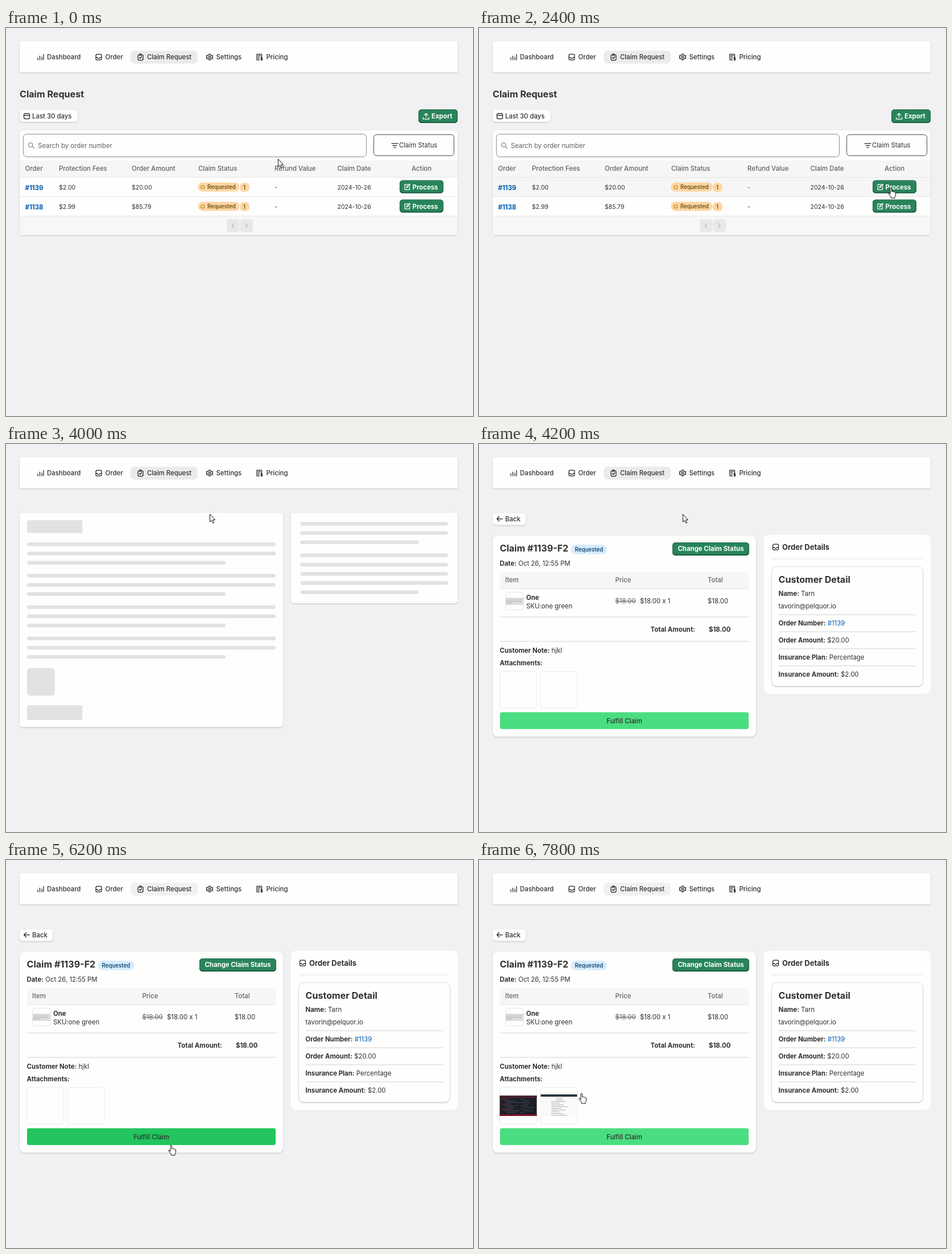
These frames come from a looping animation (821 px wide and 682 px high, 8000 ms). An HTML page:

```html
<!DOCTYPE html>
<html lang="en">
<head>
<meta charset="utf-8">
<title>Claim Request</title>
<style>
html, body { margin: 0; width: 100%; height: 100%; overflow: hidden; background: #f1f1f3; }
svg { display: block; width: 821px; height: 682px; font: 11.4px Inter, sans-serif; fill: #303030; }
text { white-space: pre; }
.m { font-weight: 550; }
.b { font-weight: 650; }
.h { font-size: 16.1px; font-weight: 650; }
.s { font-size: 10.5px; }
.badge { font-size: 9.75px; font-weight: 500; }
.grey { fill: #616161; }
.link { fill: #005bb0; }
.white { fill: #fff; }
.mid { text-anchor: middle; }
.card { fill: #fefefd; filter: drop-shadow(0 1px 1px #0003); }
.line { fill: none; stroke: currentColor; stroke-width: 1.25; stroke-linejoin: round; stroke-linecap: round; }
</style>
</head>
<body>
<svg id="stage" viewBox="0 0 821 682"></svg>
<script>
const LOOP = 8000, STEP = 200;

const text = (x, y, s, cls = '') => `<text x="${x}" y="${y}" class="${cls}">${s}</text>`;
const rect = (x, y, w, h, r, fill, more = '') =>
  `<rect x="${x}" y="${y}" width="${w}" height="${h}" rx="${r}" fill="${fill}" ${more}/>`;
const card = (x, y, w, h, r = 6) => rect(x, y, w, h, r, '', 'class="card"');
const outline = (x, y, w, h, r, color) => rect(x + .5, y + .5, w - 1, h - 1, r, 'none', `stroke="${color}"`);
const rule = (x, y, w, color = '#d4d4d4') => rect(x, y, w, 1, 0, color);
const icon = (x, y, d, color = '#222', size = 1) =>
  `<path class="line" transform="translate(${x} ${y}) scale(${size})" color="${color}" d="${d}"/>`;
const group = (id, body) => `<g id="${id}">${body}</g>`;
const greenButton = (x, y, w, h) => rect(x, y, w, h, 5.5, '#0c5132') +
  rect(x + 1, y + 1, w - 2, h - 3, 5, '#29845a', 'stroke="#3b9169" stroke-width=".6"');

const ICONS = {
  bars: 'M1 7V11M4.5 4V11M8 6V11M11 1V11',
  inbox: 'M3 1H9Q10.500 1 11 3V9Q11 11 9 11H3Q1 11 1 9V3Q1.500 1 3 1ZM1 6.500H3.500Q4 8.500 6 8.500T8.500 6.500H11',
  clip: 'M4 2H3Q1 2 1 4V9.500Q1 11.500 3 11.500H8Q10 11.500 10 9.500V4Q10 2 8 2H7M4 .7H7V3H4ZM3.500 7L5 8.500 7.700 5.500',
  gear: 'M5 .8H7L7.500 2.500 9 3.300 10.700 2.900 11.600 4.600 10.400 6 11.600 7.400 10.700 9.100 9 8.700 7.500 9.500 7 11.200H5L4.500 9.500 3 8.700 1.300 9.100 .4 7.400 1.600 6 .4 4.600 1.300 2.900 3 3.300 4.500 2.500ZM7.700 6A1.700 1.700 0 1 1 4.300 6A1.700 1.700 0 1 1 7.700 6',
  bill: 'M9.500 5V1H1V11H5.500M3 3.500H7.500M3 6H5.500M3 8.500H5M10.500 6.500H8.300V8.700H10.500V11H8M9.400 5.800V11.500',
  calendar: 'M2.500 1.500H8.500Q10.500 1.500 10.500 3.500V8.500Q10.500 10.500 8.500 10.500H2.500Q.5 10.500 .5 8.500V3.500Q.5 1.500 2.500 1.500ZM.5 4.700H10.500M3 .5V1.500M8 .5V1.500',
  search: 'M8 4.500A3.700 3.700 0 1 1 .6 4.500A3.700 3.700 0 1 1 8 4.500M7.200 7.200L10.500 10.500',
  filter: 'M0 0H11M2 3.500H9M4 7H7',
  upload: 'M5.500 7.500V1M2.500 3.500L5.500 .7 8.500 3.500M.5 7.500V10.500H10.500V7.500',
  edit: 'M6 1.500H1V10.500H9.500V6M4 7.300L4.300 5.500 9 .8 10.400 2.200 5.700 6.900Z',
  back: 'M4.500 .5L.5 4.500 4.500 8.500M.5 4.500H10.500'
};

function nav() {
  const items = [[55, 72, 'Dashboard', 'bars'], [157, 174.500, 'Order', 'inbox'], [231, 248, 'Claim Request', 'clip'],
    [352, 369.500, 'Settings', 'gear'], [440, 457.500, 'Pricing', 'bill']];
  return card(24, 23, 770, 55, 4) + rect(219, 40, 118, 22.500, 7, '#ebebec', 'id="tab"') +
    items.map(([ix, x, label, name]) => icon(ix, 45, ICONS[name]) + text(x, 55, label, 'm')).join('');
}

function claimRow(y, order, fee, amount) {
  return text(33.500, y + 4.500, order, 'b link') + text(93, y + 4, fee, 's') + text(221, y + 4, amount, 's') +
    rect(337.500, y - 8.500, 73, 16, 8, '#ffd6a4') + rect(411, y - 8, 17, 16, 7, '#ffd6a4') +
    rect(343, y - 3, 5.500, 5.500, 1.500, 'none', 'stroke="#b28400" stroke-width="1.200"') +
    `<g fill="#5e4200">${text(354, y + 3, 'Requested', 'badge')}${text(417, y + 3.500, '1', 'badge')}</g>` +
    text(472, y + 4, '-', 's') + text(582.500, y + 4, '2024-10-26', 's') +
    greenButton(692, y - 12.500, 77, 23) + icon(700, y - 6.500, ICONS.edit, '#fff') +
    text(714.500, y + 3.500, 'Process', 'b white');
}

function listPage() {
  const heads = [[33.500, 'Order'], [93, 'Protection Fees'], [221, 'Order Amount'], [338, 'Claim Status'],
    [472, 'Refund Value'], [582.500, 'Claim Date'], [713, 'Action']];
  return text(24, 122, 'Claim Request', 'h') +
    card(24, 144, 102, 21) + icon(31, 149, ICONS.calendar) + text(46, 158.500, 'Last 30 days', 'm') +
    greenButton(725, 143, 69, 24) + icon(733, 149.500, ICONS.upload, '#fff') + text(748, 159, 'Export', 'b white') +
    card(24, 180, 770, 184) +
    outline(30, 186, 604, 41, 6, '#8a8a8a') + icon(39, 201, ICONS.search, '#8a8a8a') +
    text(56, 211, 'Search by order number', 'grey') +
    outline(646, 187, 142, 38, 5, '#4a4a4a') + icon(678, 203, ICONS.filter) + text(691, 210, 'Claim Status') +
    rect(24, 233, 770, 30, 0, '#f6f6f6') + heads.map(([x, s]) => text(x, 251, s, 'm grey')).join('') +
    rect(24, 263, 770, 33, 0, '#f6f6f6', 'id="listHover"') +
    [262, 296, 330].map(y => rule(24, y, 770, '#e6e6e6')).join('') +
    claimRow(280, '#1139', '$2.00', '$20.00') + claimRow(314, '#1138', '$2.99', '$85.79') +
    rect(24, 331, 770, 33, 3, '#f7f7f7') +
    rect(388, 336.500, 22.500, 22.500, 5, '#e8e8e8') + rect(411.500, 336.500, 22.500, 22.500, 5, '#e8e8e8') +
    icon(397, 344, 'M3.500 0L0 3.500 3.500 7', '#bbb') + icon(421, 344, 'M0 0L3.500 3.500 0 7', '#bbb');
}

function skeletonPage() {
  const grey = '#e2e2e4';
  const bars = (x, y, n, full, last) => Array.from({ length: n }, (_, i) =>
    rect(x, y + i * 16.200, i < n - 1 ? full : last, 6.500, 3.200, grey)).join('');
  return card(24, 121, 463, 376.500, 5) + card(501, 121, 293, 159, 5) +
    rect(37, 134, 97.500, 22.500, 3, grey) +
    [0, 1, 2, 3].map(i => bars(37, 173 + i * 55.200, 3, 437, 349)).join('') +
    rect(37, 394, 49, 48.500, 6, grey) + rect(37, 459, 97.500, 26, 3, grey) +
    bars(517.500, 137, 3, 259.500, 208) + bars(517.500, 192.500, 5, 259.500, 208);
}

function thumbnails() {
  let out = rect(36.500, 414, 65, 36, 0, '#1c1f27') + rect(36.500, 414, 65, 4, 0, '#4a2230') +
    rect(36.500, 447, 65, 3, 0, '#7e1727');
  for (let i = 0; i < 9; i++) {
    out += rect(40 + i % 3 * 4, 420 + i * 2.900, 12 + i * 7 % 17, 1, 0, i % 3 ? '#41505e' : '#8c2f45');
    out += rect(72 + i % 2 * 5, 420 + i * 2.900, 8 + i * 5 % 13, 1, 0, '#39444f');
  }
  out += rect(108.500, 412, 64, 39, 0, '#fafafb') + rect(108.500, 412, 64, 4, 0, '#26343e');
  for (let i = 0; i < 11; i++)
    out += rect(127 + (i < 2 ? 9 : 0), 418 + i * 3, i < 2 ? 11 : 12 + i * 7 % 18, .9, 0, '#a5a8ac');
  return out;
}

function detailPage() {
  const pair = (x, y, key, value, cls = '') =>
    `<text x="${x}" y="${y}"><tspan class="b">${key}</tspan> <tspan class="${cls}">${value}</tspan></text>`;
  const facts = [['Order Number:', '#1139', 'link'], ['Order Amount:', '$20.00'],
    ['Insurance Plan:', 'Percentage'], ['Insurance Amount:', '$2.00']];
  const claim = card(24, 161, 463, 353.500, 9) + text(36.500, 188.500, 'Claim #1139-F2', 'h') +
    rect(162, 177, 63, 16.500, 8, '#d5ebff') + `<g fill="#003a5a">${text(168.500, 188.500, 'Requested', 'badge')}</g>` +
    greenButton(340, 173, 135, 23) + text(407.500, 188, 'Change Claim Status', 'b white mid') +
    pair(36.500, 214, 'Date:', 'Oct 26, 12:55 PM') +
    rect(37, 225, 437.500, 29, 0, '#f6f6f6') + rule(37, 254, 437.500, '#e6e6e6') +
    [[46, 'Item'], [239.500, 'Price'], [402, 'Total']].map(([x, s]) => text(x, 243, s, 'm grey')).join('') +
    rect(37, 255, 437.500, 42, 0, '#f7f7f7', 'id="itemHover"') +
    rect(46.500, 260.500, 32, 31, 5, '#fefefe', 'stroke="#e4e4e4"') + rect(47, 270, 31, 13, 0, '#dededc') +
    icon(49, 274, 'M0 0H27M0 3H27M0 6H11', '#aaa', .95).replace('class="line"', 'class="line" stroke-dasharray="2 2"') +
    text(83, 274, 'One', 'b') + text(83, 288.500, 'SKU:one green') +
    `<text x="239.500" y="280" class="grey" text-decoration="line-through">$18.00</text>` +
    text(283, 280, '$18.00 x 1') + text(402, 280, '$18.00') +
    rule(37, 303.500, 437.500) + text(301.500, 329.500, 'Total Amount:', 'b') + text(404, 329.500, '$18.00', 'b') +
    rule(37, 346.500, 437.500) + pair(36.500, 366.500, 'Customer Note:', 'hjkl') + text(36.500, 389, 'Attachments:', 'b') +
    outline(36, 399, 66, 66, 5, '#ebebeb') + outline(107.500, 399, 66, 66, 5, '#ebebeb') +
    group('thumbs', thumbnails()) +
    rect(37, 471.500, 437, 29.500, 3, '#4ade80', 'id="fulfill"') + text(255.500, 490.500, 'Fulfill Claim', 'm mid');
  const order = rect(501, 159.500, 293, 279.500, 9, '#fefefd') + icon(515.500, 175, ICONS.inbox) +
    `<text x="533" y="185.500" class="b" font-size="13">Order Details</text>` + rule(514, 201.500, 266, '#e6e6e6') +
    card(514.500, 216, 266, 210, 9) + outline(514, 215, 267, 211, 9, '#dedede') +
    text(526.500, 243.500, 'Customer Detail', 'h') + pair(526.500, 266.500, 'Name:', 'Tarn') +
    text(526.500, 289, 'tavorin@pelquor.io') +
    facts.map(([k, v, c], i) => rule(527, 299.500 + i * 30, 241) + pair(526.500, 319 + i * 30, k, v, c)).join('');
  return card(24, 121.500, 58.500, 21) + icon(31, 127, ICONS.back) + text(46, 136, 'Back', 'm') + claim + order;
}

const cursor = `<g id="cursor" fill="#fff" stroke="#111" stroke-linejoin="round">
  <path id="arrow" d="M.5 .5V14L3.500 11.200 5.700 16 7.800 15 5.600 10.300H9.500Z"/>
  <path id="hand" d="M4 12V2Q5.300 -.3 6.500 2V7.500Q8 6.300 9 8 10.300 7 11.300 8.600 13.200 8 13.500 10V13Q13.500 15 12 16.500V19H5.500V17L1 11.500Q.5 9 2.500 10Z"/></g>`;

const stage = document.getElementById('stage');
stage.innerHTML = nav() + group('list', listPage()) + group('skeleton', skeletonPage()) +
  group('detail', detailPage()) + cursor;

const el = Object.fromEntries([...stage.querySelectorAll('[id]')].map(e => [e.id, e]));
const show = (name, on) => el[name].style.display = on ? '' : 'none';

// time, x, y of the pointer
const path = [[0, 478, 230], [200, 478, 230], [1000, 719, 280], [3000, 719, 280], [4000, 358, 123], [4200, 358, 123],
  [5000, 405, 292], [5200, 405, 292], [5600, 310, 482], [6200, 285, 500], [6800, 285, 500], [7600, 175, 409], [LOOP, 175, 409]];

function pointer(t) {
  const i = path.findIndex(p => p[0] > t), [t0, x0, y0] = path[i - 1], [t1, x1, y1] = path[i];
  const u = (t - t0) / (t1 - t0), e = u * u * (3 - 2 * u);
  return [x0 + (x1 - x0) * e, y0 + (y1 - y0) * e];
}

function draw(now) {
  const t = Math.floor(now % LOOP / STEP) * STEP;
  const within = (a, b) => t >= a && t < b;
  const [x, y] = pointer(t);
  const onProcess = within(800, 1400) || within(2000, 2600);
  const onFulfill = within(5400, 7000);
  const hand = onProcess || t >= 5400;

  show('list', t < 2600);
  show('skeleton', within(2600, 4200));
  show('detail', t >= 4200);
  show('listHover', onProcess);
  show('itemHover', within(4800, 5400));
  show('thumbs', t >= 7000);
  show('cursor', !within(1400, 2000));
  show('hand', hand);
  show('arrow', !hand);
  el.tab.setAttribute('fill', t < 4400 ? '#ebebec' : '#f1f1f3');
  el.fulfill.setAttribute('fill', onFulfill ? '#22c55e' : '#4ade80');
  el.cursor.setAttribute('transform', `translate(${x} ${y})`);
  requestAnimationFrame(draw);
}
requestAnimationFrame(draw);
</script>
</body>
</html>
```
